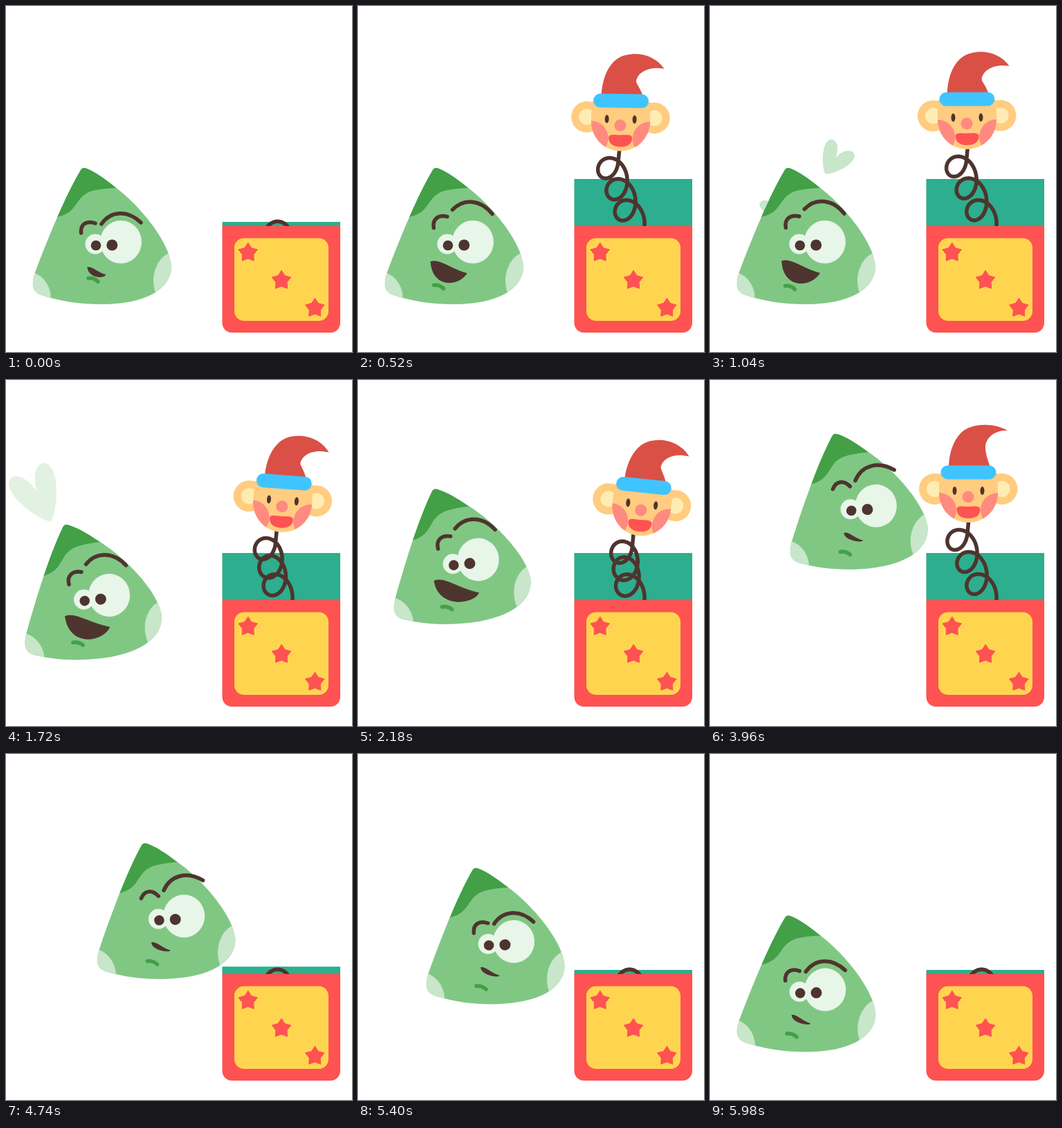
Recreate the animation shown at these times as an HTML page with a canvas. Size 500x500 px, loop 6 s.

```html
<!DOCTYPE html>
<html lang="en">
<head>
<meta charset="utf-8">
<title>Jack in the box</title>
<style>
html, body { margin: 0; width: 100%; height: 100%; overflow: hidden; background: #fff; }
canvas { display: block; }
</style>
</head>
<body>
<canvas id="stage" width="500" height="500"></canvas>
<script>
const ctx = document.getElementById('stage').getContext('2d');
const LOOP = 6000, BROWN = '#4e342e', LEAF = '#43a047', PALE = '#c8e6c9', RED = '#ff5252', PINK = '#ff8a80';

// Timing helpers: linear progress, eased progress, and a rise followed by a fall.
const ramp = (t, from, to) => Math.min(1, Math.max(0, (t - from) / (to - from)));
const ease = (t, from, to) => (1 - Math.cos(Math.PI * ramp(t, from, to))) / 2;
const hump = (t, from, top, to) => ease(t, from, top) - ease(t, top, to);

// Smooth path through [time, x, y] points without overshoot.
function along(points, t) {
  const last = points.length - 1;
  t = Math.min(points[last][0], Math.max(points[0][0], t));
  let i = 0;
  while (i < last - 1 && points[i + 1][0] < t) i++;
  const [from, to] = [points[i], points[i + 1]];
  const step = to[0] - from[0], u = (t - from[0]) / step;
  const secant = (n, k) => (points[n + 1][k] - points[n][k]) / (points[n + 1][0] - points[n][0]);
  const slope = (n, k) => {
    if (n === 0) return 0;
    if (n === last) return secant(n - 1, k);
    const a = secant(n - 1, k), b = secant(n, k);
    return a * b <= 0 ? 0 : 2 * a * b / (a + b);
  };
  return [1, 2].map(k => from[k] + (to[k] - from[k]) * u * u * (3 - 2 * u)
    + step * u * (1 - u) * (slope(i, k) * (1 - u) - slope(i + 1, k) * u));
}

function fill(color, path) {
  ctx.fillStyle = color;
  ctx.fill(path);
}
function line(color, width, path) {
  ctx.strokeStyle = color;
  ctx.lineWidth = width;
  ctx.lineCap = ctx.lineJoin = 'round';
  ctx.stroke(path);
}
function oval(color, x, y, rx, ry = rx) {
  const p = new Path2D();
  p.ellipse(x, y, rx, ry, 0, 0, 7);
  fill(color, p);
}
function box(color, x, y, w, h, r) {
  const p = new Path2D();
  p.roundRect(x, y, w, h, r);
  fill(color, p);
}
function turn(x, y, px, py, degrees) {
  ctx.translate(x, y);
  ctx.rotate(degrees * Math.PI / 180);
  ctx.translate(-px, -py);
}

const skin = new Path2D('M108 237C92 264 72 306 42 385C36 404 38 413 52 418C80 427 106 431 139 431C200 431 239 410 239 376C237 340 190 285 158 262C142 249 129 240 117 235C112 233 110 234 108 237Z');
const cap = new Path2D('M60 306L74 305C108 298 97 272 130 266C140 264 150 263 162 263V220H60Z');
const heart = new Path2D('M0 0C-8-4-24-24-25-38C-26-53-5-53 0-28C5-53 26-53 25-38C24-24 8-4 0 0Z');
const face = new Path2D('M331 135V163C331 187 350 206 373.5 206S416 187 416 163V135Z');
const grin = new Path2D('M356.5 186C358 181 366 183 373 183C381 183 388 181 390.5 186C391 195 384 200 373.5 200C363 200 356 195 356.5 186Z');

const flight = [[1200, 139, 333], [1720, 121.5, 305.5], [2490, 172.5, 211.5], [2700, 190.5, 181.3],
  [3960, 212.5, 175.3], [4740, 230, 227], [4970, 226.5, 230.5], [5985, 139, 333]];

function drawHeart(age, x, y, dx, angle) {
  if (age < 0) return;
  const u = age / 680;
  ctx.save();
  ctx.globalAlpha = 1 - ramp(age, 560, 820);
  turn(x + dx * u, y - 102 * u, 0, 0, angle);
  ctx.scale(0.75 + 0.6 * u, 0.7 + u);
  fill(PALE, heart);
  ctx.restore();
}

// An arch of height h over the line from (x1, y1) to (x2, y2).
function drawBrow(x1, y1, x2, y2, h) {
  const dx = x2 - x1, dy = y2 - y1, k = h / Math.hypot(dx, dy);
  const control = u => [x1 + dx * u + dy * k, y1 + dy * u - dx * k];
  line(BROWN, 5.5, new Path2D(`M${x1} ${y1}C${control(0.25)},${control(0.68)},${x2},${y2}`));
}

function drawMouth(t) {
  const pucker = 1 - ease(t, 0, 650);
  const wide = 0.78 * (1 - pucker) + 0.22 * ease(t, 1040, 1720) - ease(t, 2700, 3200);
  const open = 1 - 0.8 * pucker - ease(t, 1900, 2700);
  const left = 118 - 18 * wide, top = 378 - 12 * wide;
  const right = 144 + 18.5 * wide, low = 390 + 4 * wide - 7 * open, w = right - left;
  const lips = new Path2D(`M${left} ${top}
    C${left + 0.25 * w} ${top - 0.08 * w} ${right - 0.45 * w} ${low - 0.12 * w} ${right} ${low}
    C${right - 0.1 * w - 6 * open} ${low + 0.1 * w + 14 * open} ${left + 0.04 * w} ${top + 0.4 * w + 20 * open} ${left} ${top}Z`);
  fill(BROWN, lips);
  line(BROWN, 1, lips);
  line(LEAF, 5.5, new Path2D(`M${111 - 3 * wide + 8 * pucker} ${404.5 - 11 * pucker}q8-1 14 5`));
}

function drawFellow(t) {
  const [x, y] = along(flight, t);
  const wary = hump(t, 2750, 3500, 4950) && ease(t, 2750, 3500) - ease(t, 4950, 5900);
  const raise = ease(t, 0, 600) - ease(t, 2750, 3500);
  ctx.save();
  turn(x, y, 139, 333, 5 * (ramp(t, 2650, 5985) - ease(t, 1200, 1720)));
  fill('#81c784', skin);
  ctx.save();
  ctx.clip(skin);
  fill(LEAF, cap);
  oval(PALE, 248, 397, 35, 43);
  oval(PALE, 31, 423, 34, 39);
  ctx.restore();
  oval('#e8f5e9', 129, 344, 14.5);
  oval('#e8f5e9', 166, 341, 30, 31);
  oval(BROWN, 130, 346, 7.3);
  oval(BROWN, 153.3, 345.5, 8);
  drawBrow(108.5 + raise - 3.5 * wary, 328 - 7.5 * raise - 14.5 * wary,
    129 + wary, 314 - 10 * raise - 3 * wary, 11);
  drawBrow(138 - 1.5 * raise, 315 - 21.5 * raise - 12 * wary,
    195 - raise, 313 - 13 * raise - 22.5 * wary, 19);
  drawMouth(t);
  ctx.restore();
}

// Three loops whose upper part follows the head.
function drawSpring(dx, dy, sunk) {
  const coil = new Path2D();
  coil.moveTo(374 + dx, 200 + dy + sunk);
  for (let n = 0.04; n < 3.08; n += 0.02) {
    const a = n * 2 * Math.PI, pull = ease(n, 3, 0);
    coil.lineTo(354 + 14 * n + 18 * Math.cos(a) + dx * pull,
      215 + 32 * n + 22 * Math.sin(a) + dy * pull + sunk * (0.1 + 0.9 * pull));
  }
  line(BROWN, 5.5, coil);
}

function drawToy(t) {
  const sway = 9 * hump(t, 300, 660, 900) - 2 * hump(t, 800, 1040, 1250) + 41 * hump(t, 1250, 2050, 2650);
  const dip = Math.abs(sway) * 0.53;
  const sunk = 262 * ((1 - ramp(t, 60, 580)) ** 3 + ease(t, 4000, 4640));
  const d = 1 - ease(t, 2050, 2680);

  ctx.save();
  ctx.beginPath();
  ctx.rect(0, 0, 500, 318.5);
  ctx.clip();
  drawSpring(sway * 0.67, dip, sunk);
  turn(373.5 + sway, 164 + dip + sunk, 373.5, 164, sway * 0.16);
  for (const x of [324.5, 422]) {
    oval('#ffcc80', x, 157.5, 22.5);
    oval('#ffecb3', x, 157.5, 11.5);
  }
  fill('#ffcc80', face);
  ctx.save();
  ctx.clip(face);
  oval(PINK, 331, 188, 25);
  oval(PINK, 416, 188, 25);
  ctx.restore();
  oval(BROWN, 353.5, 160, 3, 6);
  oval(BROWN, 393.5, 160, 3, 6);
  oval(PINK, 373, 169, 8.5);
  fill(RED, grin);
  // The hat tip hangs by d.
  fill('#da5046', new Path2D(`M345 126C346 96 358 72 380 67C398 62 ${418 + 4 * d} ${66 + d} ${430 + 5 * d} ${73 + 13 * d}
    C410 ${72 + 10 * d} ${398 - 3 * d} ${85 + 9 * d} ${398 - 3 * d} ${97 + 9 * d}C398 ${107 + 5 * d} 402 117 405 126Z`));
  box('#40c4ff', 333.5, 123.5, 80, 20, 10);
  ctx.restore();
}

function drawStar(x, y) {
  const p = new Path2D();
  for (let i = 0; i < 10; i++) {
    const a = i * Math.PI / 5, r = i % 2 ? 8.5 : 14.5;
    p.lineTo(x + r * Math.sin(a), y - r * Math.cos(a));
  }
  p.closePath();
  fill(RED, p);
  line(RED, 1, p);
}

function draw(t) {
  ctx.clearRect(0, 0, 500, 500);
  const lid = 6 + 62 * (ease(t, 0, 450) - ease(t, 4000, 4900));
  box('#2dae8e', 312.5, 318 - lid, 170.5, lid + 1, 0);
  drawToy(t);
  box(RED, 312.5, 318, 170.5, 154, [0, 0, 14, 14]);
  box('#ffd54f', 330, 335.5, 136, 119.5, 14);
  for (let i = -1; i < 2; i++) drawStar(398 + 48.3 * i, 396.5 + 40 * i);
  drawHeart(t - 840, 155, 273, 40, 32);
  drawHeart(t - 1040, 101, 307, -36, -25);
  drawFellow(t);
}

const start = performance.now();
(function tick() {
  draw((performance.now() - start) % LOOP);
  requestAnimationFrame(tick);
})();
</script>
</body>
</html>
```
